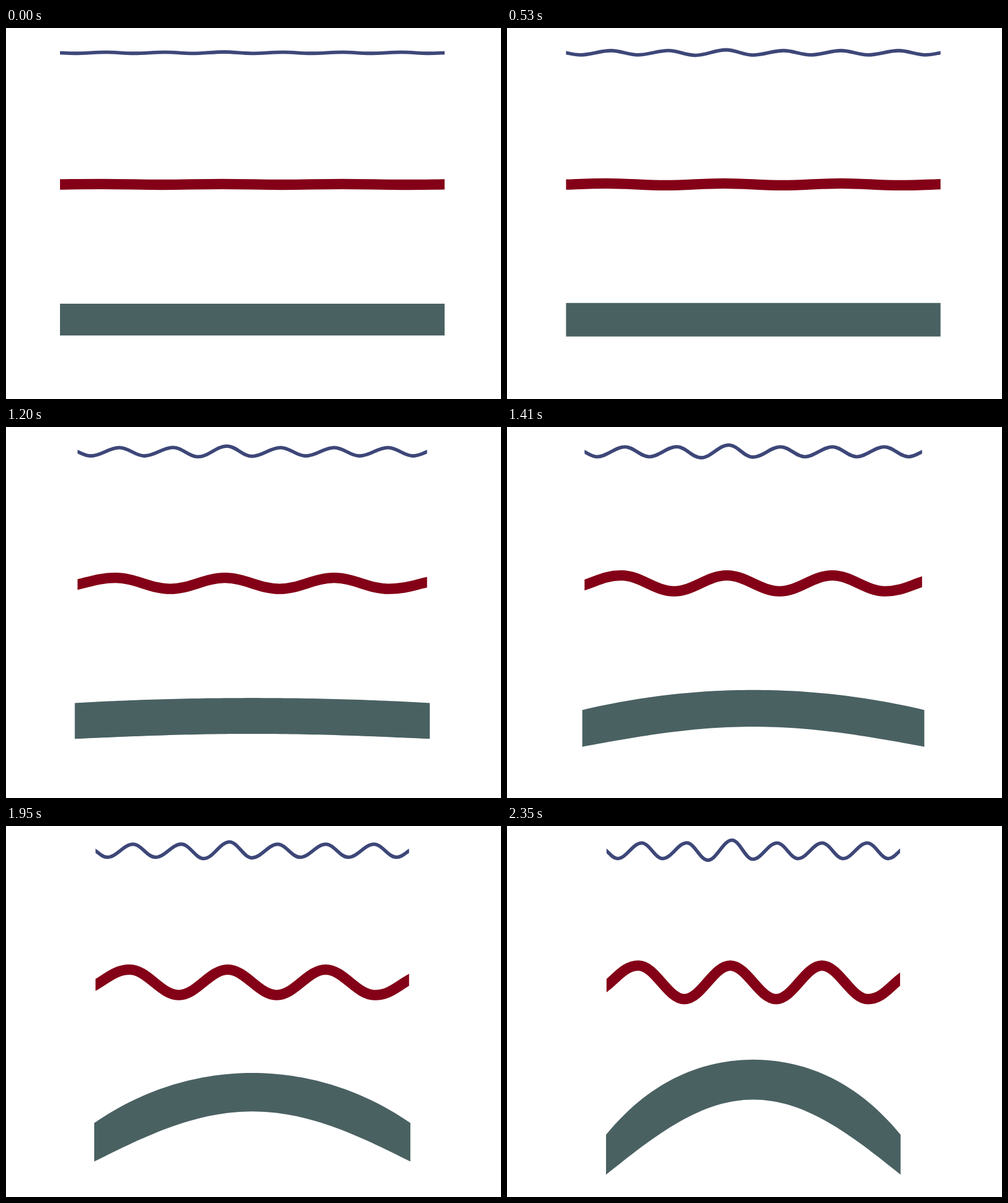
These frames come from a looping animation (825x619 px, 2420 ms). An HTML page with a canvas:

```html
<!DOCTYPE html>
<html lang="en">
<head>
<meta charset="utf-8">
<title>Buckling bars</title>
<style>
  html, body { margin: 0; width: 100%; height: 100%; overflow: hidden; background: #fff; }
  canvas { display: block; filter: blur(.6px); }
</style>
</head>
<body>
<canvas id="stage" width="825" height="619"></canvas>
<script>
const ctx = document.getElementById('stage').getContext('2d');
const LOOP = 2420, MID = 410.5, FULL = 320.5;

// Extremes lie evenly spaced from `first` (in half lengths); crests may lean and swell.
const BLUE = {
  y: 41.3, width: 5.8, color: '#3d4778', count: 13, first: -.925, gap: .1537, lean: .011,
  sign: 1, end: 0, swell: u => .96 + .38 * Math.exp(-(((u + .19) / .15) ** 2))
};
const RED = {
  y: 260.9, width: 17.3, color: '#840017', count: 6, first: -.782, gap: .3125, lean: 0,
  sign: -1, end: .2, swell: () => 1
};

const past = (k, knee) => Math.max(0, k - knee);

// The simulation advances on about four of every five ticks.
function stepAt(ms) {
  const tick = Math.min(35, Math.floor((ms + 15) / 67.2));
  return Math.floor(tick * .806 + .22);
}

// Slow squeeze at first, faster once the bar has buckled.
const halfLength = (k, knee, rate) => FULL - 1.4 * k - rate * past(k, knee);

function extremes(bar, half, amp) {
  return Array.from({ length: bar.count }, (_, i) => {
    const dir = bar.sign * (i % 2 ? -1 : 1);
    const u = bar.first + bar.gap * i + (dir < 0 ? bar.lean : 0);
    return [MID + u * half, bar.y + dir * amp * bar.swell(u)];
  });
}

function drawWave(bar, half, amp) {
  const pts = extremes(bar, half, amp);
  const first = pts[0], last = pts[pts.length - 1];
  const tip = (side, [x, y]) => {
    const ex = MID + side * half, ey = bar.y - side * bar.end * amp;
    return { ex, ey, dx: (x - ex) / 3, dy: (y - ey) * 1.25 / 3, cx: x - (x - ex) * .42 };
  };
  const l = tip(-1, first), r = tip(1, last);

  ctx.save();
  ctx.beginPath();
  ctx.rect(MID - half, 0, half * 2, 619);
  ctx.clip();
  ctx.beginPath();
  // Overshoot both tips so that the clip cuts them vertically.
  ctx.moveTo(l.ex - l.dx * 2, l.ey - l.dy * 2);
  ctx.lineTo(l.ex, l.ey);
  ctx.bezierCurveTo(l.ex + l.dx, l.ey + l.dy, l.cx, first[1], ...first);
  for (let i = 1; i < pts.length; i++) {
    const [x0, y0] = pts[i - 1], [x1, y1] = pts[i], c = (x1 - x0) * .3642;
    ctx.bezierCurveTo(x0 + c, y0, x1 - c, y1, x1, y1);
  }
  ctx.bezierCurveTo(r.cx, last[1], r.ex + r.dx, r.ey + r.dy, r.ex, r.ey);
  ctx.lineTo(r.ex - r.dx * 2, r.ey - r.dy * 2);
  ctx.lineWidth = bar.width;
  ctx.strokeStyle = bar.color;
  ctx.stroke();
  ctx.restore();
}

function drawArch(k) {
  const half = halfLength(k, 11.7, 2.2);
  const top = 460 - .2 * k - 4.25 * past(k, 12.8);
  const bottom = top + 53 + .49 * k;
  const sag = 8.35 * past(k, 13);
  const round = .19 * (sag / 125) ** 2;
  const upper = u => top + sag * u * u * (1 - round * (1 - u * u));
  const lower = u => bottom + sag * (1 - Math.cos(u * Math.PI / 2));
  ctx.beginPath();
  for (let u = -1; u < 1.01; u += 1 / 32) ctx.lineTo(MID + u * half, upper(u));
  for (let u = 1; u > -1.01; u -= 1 / 32) ctx.lineTo(MID + u * half, lower(u));
  ctx.fillStyle = '#4a6162';
  ctx.fill();
}

function draw(ms) {
  const k = stepAt(ms), half = halfLength(k, 9, 1.93);
  ctx.fillStyle = '#fff';
  ctx.fillRect(0, 0, 825, 619);
  drawWave(BLUE, half, 1 + .447 * k);
  drawWave(RED, half, Math.max(.6 + .16 * k, 1.343 * k - 9.6));
  drawArch(k);
}

const start = performance.now();
function loop() {
  draw((performance.now() - start) % LOOP);
  requestAnimationFrame(loop);
}
loop();
</script>
</body>
</html>
```
